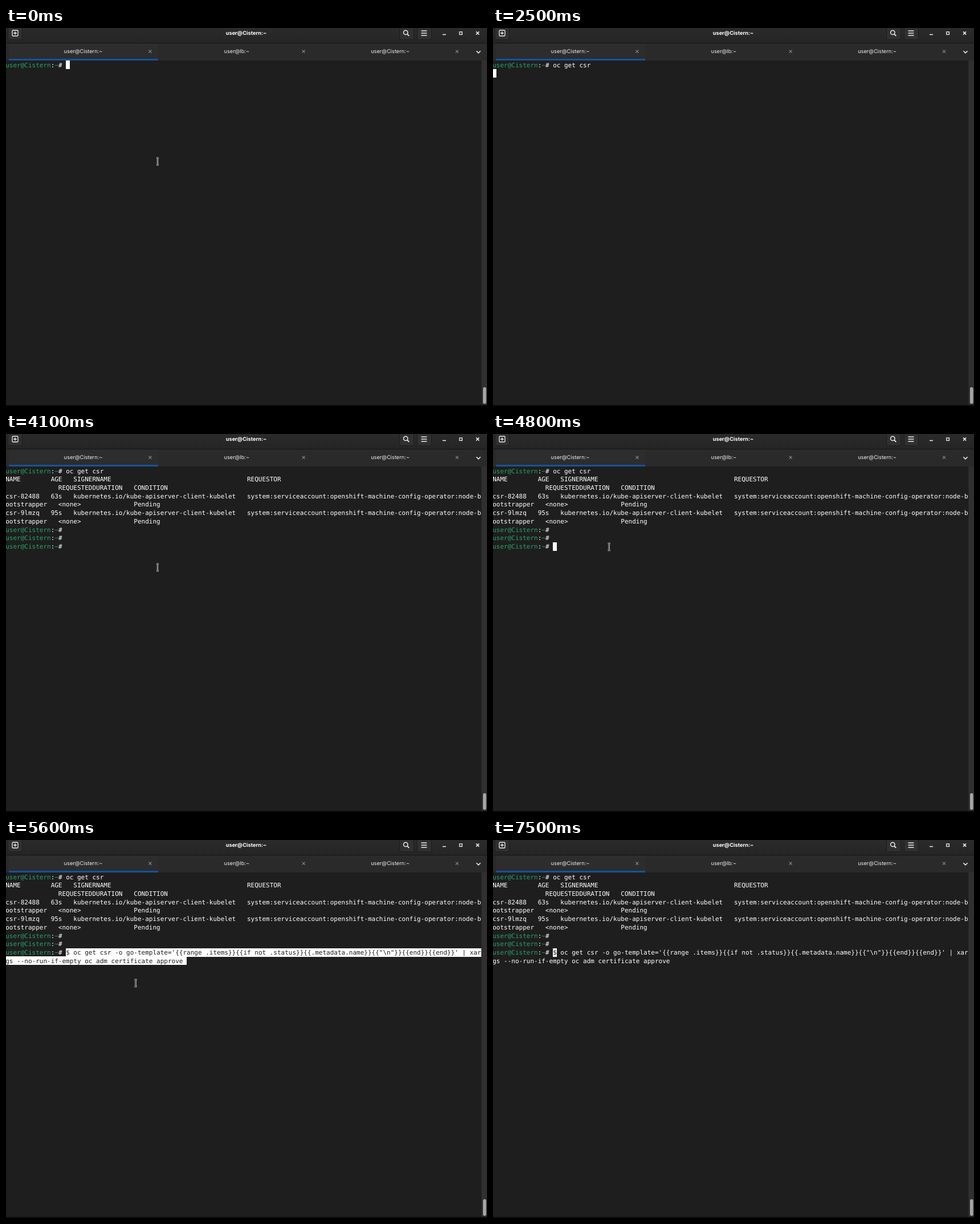
Recreate the animation shown at these times as an HTML page. Size 844 by 663 pixels, loop 8000 ms.

```html
<!DOCTYPE html>
<html lang="en">
<head>
<meta charset="utf-8">
<title>Terminal</title>
<style>
  html, body { margin: 0; width: 100%; height: 100%; overflow: hidden; background: #1e1e1e; }
  svg { display: block; width: 844px; height: 663px; }
  text { white-space: pre; text-rendering: geometricPrecision; }
  .ui { font: 9.2px Inter, sans-serif; fill: #eee; }
  .mid { text-anchor: middle; }
  .bold { font-weight: 700; fill: #fff; }
  .dim { fill: #8c8c8c; }
  .term { font: 11px "DejaVu Sans Mono", monospace; fill: #fff; }
  .green { fill: #26a269; }
  .line { fill: none; stroke: #eee; stroke-width: 1.3; }
  .btn { fill: #303030; stroke: #1c1c1c; }
</style>
</head>
<body>
<svg id="stage" viewBox="0 0 844 663">
  <defs>
    <linearGradient id="bar" x2="0" y2="1">
      <stop stop-color="#2b2b2b"/><stop offset="1" stop-color="#252525"/>
    </linearGradient>
  </defs>
  <rect width="844" height="663" fill="#1e1e1e"/>

  <rect width="844" height="26" fill="url(#bar)"/>
  <rect y="26" width="844" height="1" fill="#151515"/>
  <rect class="btn" x="3.5" y="-5.5" width="25" height="26" rx="3"/>
  <rect class="btn" x="690.5" y="-5.5" width="25" height="26" rx="3"/>
  <rect class="btn" x="721.5" y="-5.5" width="25" height="26" rx="3"/>
  <rect class="line" x="11" y="4" width="10" height="10" rx="1.6"/>
  <path class="line" d="M16 6.2v5.6M13.2 9h5.6"/>
  <circle class="line" cx="701.3" cy="7.9" r="3.7" style="stroke-width:1.5"/>
  <path class="line" d="M704 10.6l3.3 3.3" style="stroke-width:1.8"/>
  <path class="line" d="M728.5 5h10M728.5 9h10M728.5 13h10"/>
  <path class="line" d="M766 11.5h6" style="stroke-width:1.5"/>
  <rect class="line" x="795.8" y="6.8" width="4.6" height="4.6"/>
  <path class="line" d="M825 6.4l5.2 5.2m0-5.2l-5.2 5.2" style="stroke-width:1.5"/>

  <rect y="27" width="844" height="30" fill="#2a2a2a"/>
  <rect x="5" y="27" width="262" height="27" fill="#2d2d2d"/>
  <rect x="5" y="54" width="262" height="3" fill="#15539e"/>
  <path class="line" d="M825.4 40.2l3.6 3.6l3.6-3.6" style="stroke-width:1.6"/>

  <rect x="834" y="57" width="10" height="604" fill="#303030"/>
  <rect x="834" y="57" width="1" height="604" fill="#272727"/>
  <rect x="837" y="630" width="5.6" height="29" rx="2.8" fill="#a6a6a4"/>
  <rect y="661" width="844" height="2" fill="#0d0d0d"/>

  <g id="select" fill="#fff">
    <rect x="105" y="190" width="729" height="15"/>
    <rect y="204" width="310.4" height="15"/>
  </g>
  <rect id="caret"/>
  <g id="screen"></g>

  <g id="menu">
    <rect x="204.5" y="198.5" width="107.5" height="155.5" rx="4" fill="#2f2f2f" stroke="#4b4b4b"/>
    <path d="M205 294.5h107M205 332.5h107" stroke="#292929"/>
    <rect id="hot" x="205" y="238" width="107" height="19" fill="#15539e"/>
    <rect class="line" x="209.5" y="261.5" width="11" height="10.5" rx="2" style="stroke-width:1"/>
    <rect class="line" x="209.5" y="336.5" width="11" height="10.5" rx="2" style="stroke-width:1"/>
  </g>
  <g id="beam" fill="none">
    <path d="M-2 -6h4M0 -6v12M-2 6h4" stroke="#e8e8e8" stroke-width="2.4"/>
    <path d="M-2 -6h4M0 -6v12M-2 6h4" stroke="#111" stroke-width=".9"/>
  </g>
  <path id="arrow" d="M0 0v13.4l3-2.8l2.3 5.4l2.3-1l-2.2-5.2h4z" fill="#111" stroke="#eee" stroke-width=".9"/>
</svg>

<script>
const LOOP = 8000, CELL = 6.622, LEFT = -0.85, ROW = 14.72, TOP = 57.2;
const HOST = "user@Cistern";
const $ = id => document.getElementById(id);

function add(parent, tag, cls, content, attrs = {}) {
  const el = document.createElementNS("http://www.w3.org/2000/svg", tag);
  if (cls) el.setAttribute("class", cls);
  for (const k in attrs) el.setAttribute(k, attrs[k]);
  el.textContent = content;
  return parent.appendChild(el);
}
const show = (el, on) => { el.style.display = on ? "" : "none"; };

// Window title and tabs
const stage = $("stage");
add(stage, "text", "ui mid bold", HOST + ":~", { x: 421.5, y: 12.2 });
[HOST, "user@lb", HOST].forEach((name, i) => {
  add(stage, "text", "ui mid", name + ":~", { x: 135.5 + i * 269.3, y: 44.4 });
  add(stage, "path", "line", "", {
    d: `M${250.4 + i * 269.3} 38.6l5 5m0 -5l-5 5`, style: "stroke:#858585"
  });
});

// Context menu labels
["Copy", "Copy as HTML", "Paste", "Read-Only", "Preferences", "New Window", "New Tab", "Show Menubar"]
  .forEach((label, i) => add($("menu"), "text", i < 2 ? "ui dim" : "ui", label,
    { x: 225.8, y: 214.4 + i * 18.7 }));
stage.append($("beam"), $("arrow"));

// Terminal rows
const entry = (name, age) => [
  name.padEnd(12) + age.padEnd(6) + "kubernetes.io/kube-apiserver-client-kubelet".padEnd(46) +
    "system:serviceaccount:openshift-machine-config-operator:node-b",
  "ootstrapper".padEnd(14) + "<none>".padEnd(20) + "Pending"
];
const output = [
  "NAME".padEnd(12) + "AGE".padEnd(6) + "SIGNERNAME".padEnd(46) + "REQUESTOR",
  " ".repeat(14) + "REQUESTEDDURATION".padEnd(20) + "CONDITION",
  ...entry("csr-82488", "63s"),
  ...entry("csr-9lmzq", "95s")
];
const command = "oc get csr";
const pasted = [
  "$",
  ` oc get csr -o go-template='{{range .items}}{{if not .status}}{{.metadata.name}}{{"\\n"}}{{end}}{{end}}' | xar`,
  "gs --no-run-if-empty oc adm certificate approve"
];

const rows = Array.from({ length: 11 }, (_, r) =>
  add($("screen"), "text", "term", "", { x: LEFT, y: TOP + r * ROW + 11.3 }));
const prompt = row => {
  add(row, "tspan", "green", HOST);
  add(row, "tspan", "", ":");
  add(row, "tspan", "green", "~");
  add(row, "tspan", "", "# ");
};
[0, 7, 8, 9].forEach(r => prompt(rows[r]));
output.forEach((line, i) => { rows[i + 1].textContent = line; });
const typed = add(rows[0], "tspan", "", "");
const dollar = add(rows[9], "tspan", "", pasted[0]);
const rest = add(rows[9], "tspan", "", pasted[1]);
rows[10].textContent = pasted[2];

// Each step changes part of the state from its time on
const steps = [
  [0, { chars: 0, lines: 1, at: [0, 16], caret: "on", mouse: [266, 234], menu: 0, hot: 0, paste: 0, select: 0 }],
  [100, { caret: "off" }],
  [500, { caret: "on", mouse: null }],
  ...[600, 700, 1100, 1200, 1400, 1500, 1600, 1900, 2000, 2200]
    .map((t, i) => [t, { chars: i + 1, at: [0, 17 + i] }]),
  [2500, { at: [1, 0] }],
  [2600, { lines: 8, at: [7, 16] }],
  [3000, { caret: "off" }],
  [3200, { lines: 9, at: [8, 16], caret: "on" }],
  [3300, { at: [9, 0] }],
  [3400, { lines: 10, at: [9, 16] }],
  [3900, { caret: "off" }],
  [4100, { mouse: [266, 234] }],
  [4200, { mouse: [266, 236] }],
  [4500, { caret: "on", mouse: [262, 234] }],
  [4600, { mouse: [242, 223] }],
  [4700, { mouse: [214, 204] }],
  [4800, { mouse: [203.7, 198] }],
  [4900, { caret: "box", menu: 1 }],
  [5000, { mouse: [206, 203] }],
  [5100, { mouse: [210, 213] }],
  [5200, { mouse: [215, 227] }],
  [5300, { mouse: [222, 241], hot: 1 }],
  [5400, { mouse: [227.6, 251] }],
  [5600, { menu: 0, hot: 0, caret: "on", lines: 11, at: [10, 47], paste: 1, select: 1 }],
  [6200, { caret: "off" }],
  [6700, { caret: "on", select: 0, mouse: null }],
  [7500, { at: [9, 16] }]
];

function drawCaret({ at: [row, col], caret }) {
  const box = caret === "box", inset = box ? 0.5 : 0;
  const x = Math.round(LEFT + col * CELL), y = Math.round(TOP + row * ROW);
  const attrs = {
    x: Math.max(0, x) + inset, y: y + inset,
    width: (col ? 7 : 6) - 2 * inset, height: 15 - 2 * inset,
    fill: box ? "none" : "#fff", stroke: box ? "#fff" : "none"
  };
  for (const k in attrs) $("caret").setAttribute(k, attrs[k]);
  show($("caret"), caret !== "off");
}

function draw(s) {
  typed.textContent = command.slice(0, s.chars);
  rows.forEach((row, i) => show(row, i < s.lines));
  show(dollar, s.paste);
  show(rest, s.paste);
  show($("select"), s.select);
  const ink = s.select ? "#1e1e1e" : "#fff";
  const covered = s.paste && s.at[0] === 9;
  dollar.style.fill = covered ? "#1e1e1e" : ink;
  rest.style.fill = rows[10].style.fill = ink;
  drawCaret(s);
  show($("menu"), s.menu);
  show($("hot"), s.hot);
  show($("beam"), s.mouse && !s.menu);
  show($("arrow"), s.mouse && s.menu);
  if (s.mouse) $(s.menu ? "arrow" : "beam").setAttribute("transform", `translate(${s.mouse})`);
}

let last = -1;
function tick() {
  const t = performance.now() % LOOP;
  const past = steps.filter(([at]) => at <= t);
  if (past.length !== last) {
    last = past.length;
    draw(Object.assign({}, ...past.map(([, change]) => change)));
  }
  requestAnimationFrame(tick);
}
tick();
</script>
</body>
</html>
```
